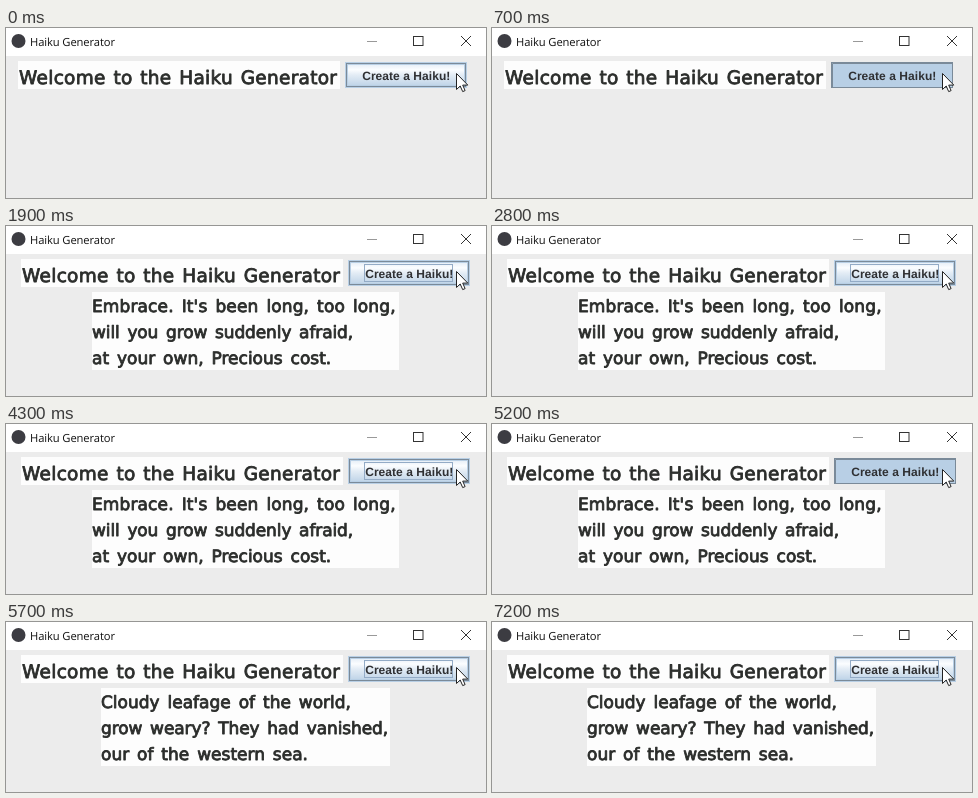
Write an HTML page that moves like this. It is 480 px wide and 170 px high and loops after 8000 ms.

```html
<!DOCTYPE html>
<html lang="en">
<head>
<meta charset="utf-8">
<title>Haiku Generator</title>
<style>
  html, body { margin: 0; width: 100%; height: 100%; overflow: hidden; background: #ececec; }
  svg { display: block; width: 480px; height: 170px; }
  text { text-rendering: geometricPrecision; white-space: pre; }

  .caption { font: 11.2px "Open Sans", "Noto Sans", sans-serif; letter-spacing: -.1px; fill: #111; }
  .label { font: bold 12px "Liberation Sans", Arial, sans-serif; letter-spacing: .05px; fill: #2f3033; }
  .hand {
    font-family: "DejaVu Sans", sans-serif;
    fill: #2b2d2b; stroke: #2b2d2b; stroke-width: .85; stroke-linejoin: round;
  }
  .heading { font-size: 18.5px; letter-spacing: .3px; word-spacing: 1.5px; }
  .poem { font-size: 17px; word-spacing: 2.5px; }

  .header, .pressed, .focus, .first, .second { animation: 8s step-end infinite; }
  .header { animation-name: shift; }
  .pressed { animation-name: press; }
  .focus { animation-name: focus; }
  .first { animation-name: first; }
  .second { animation-name: second; }

  @keyframes shift {
    0% { transform: translateX(0); }
    11.25%, 100% { transform: translateX(3px); }
  }
  @keyframes press {
    0% { opacity: 0; }
    6.25% { opacity: 1; }
    11.25% { opacity: 0; }
    62.5% { opacity: 1; }
    66.25%, 100% { opacity: 0; }
  }
  @keyframes focus {
    0% { opacity: 0; }
    11.25% { opacity: 1; }
    62.5% { opacity: 0; }
    66.25%, 100% { opacity: 1; }
  }
  @keyframes first {
    0% { opacity: 0; }
    11.25% { opacity: 1; }
    66.25%, 100% { opacity: 0; }
  }
  @keyframes second {
    0% { opacity: 0; }
    66.25%, 100% { opacity: 1; }
  }
</style>
</head>
<body>
<svg viewBox="0 0 480 170" xmlns="http://www.w3.org/2000/svg">
  <defs>
    <linearGradient id="steel" x1="0" y1="0" x2="0" y2="1">
      <stop offset="0" stop-color="#dde8f3"/>
      <stop offset=".3" stop-color="#fbfdff"/>
      <stop offset=".5" stop-color="#e3ecf5"/>
      <stop offset="1" stop-color="#b8cfe5"/>
    </linearGradient>
  </defs>

  <rect width="480" height="170" fill="#ececec"/>

  <!-- title bar -->
  <rect width="480" height="28" fill="#fff"/>
  <circle cx="12.5" cy="13" r="7" fill="#3c3c42"/>
  <text class="caption" x="24" y="17.7">Haiku Generator</text>
  <g fill="none" stroke="#333" stroke-width="1">
    <path d="M361 13.5h10" stroke="#999"/>
    <rect x="407.5" y="8.5" width="9.5" height="9"/>
    <path d="M455 8l10 10M465 8l-10 10"/>
  </g>

  <g class="header">
    <rect x="12" y="33" width="322" height="28" fill="#fdfdfd"/>
    <text class="hand heading" x="13" y="55.6">Welcome to the Haiku Generator</text>

    <!-- button: a dark frame between two pale ones -->
    <rect x="339" y="34" width="122" height="26" fill="url(#steel)"/>
    <g fill="none" stroke="#b8cfe5">
      <rect x="339.5" y="34.5" width="121" height="25"/>
      <rect x="341.5" y="36.5" width="117" height="21"/>
      <rect x="340.5" y="35.5" width="119" height="23" stroke="#7a8a99"/>
    </g>
    <rect class="focus" x="355.5" y="38.5" width="88" height="17" fill="none" stroke="#93abc6"/>
    <g class="pressed">
      <rect x="339.5" y="34.5" width="121" height="25" fill="#b8cfe5" stroke="#7a8a99"/>
      <path d="M340.5 59v-23.5h119.5" fill="none" stroke="#7a8a99"/>
    </g>
    <text class="label" x="356.2" y="52">Create a Haiku!</text>
  </g>

  <g class="first">
    <rect x="86" y="66" width="307" height="78" fill="#fdfdfd"/>
    <g class="hand poem">
      <text x="86" y="86.4" letter-spacing=".12">Embrace. It's been long, too long,</text>
      <text x="86" y="112.4" letter-spacing="-.12">will you grow suddenly afraid,</text>
      <text x="86" y="138.4">at your own, Precious cost.</text>
    </g>
  </g>

  <g class="second">
    <rect x="95" y="66" width="289" height="78" fill="#fdfdfd"/>
    <g class="hand poem">
      <text x="95" y="86.4">Cloudy leafage of the world,</text>
      <text x="95" y="112.4" letter-spacing="-.1">grow weary? They had vanished,</text>
      <text x="95" y="138.4">our of the western sea.</text>
    </g>
  </g>

  <!-- pointer -->
  <path d="M450.5 45.5v16l3.7-3.5 2.5 5.6 2.4-1-2.4-5.5h5.1z" fill="#fff" stroke="#222" stroke-width="1"/>
</svg>
</body>
</html>
```
